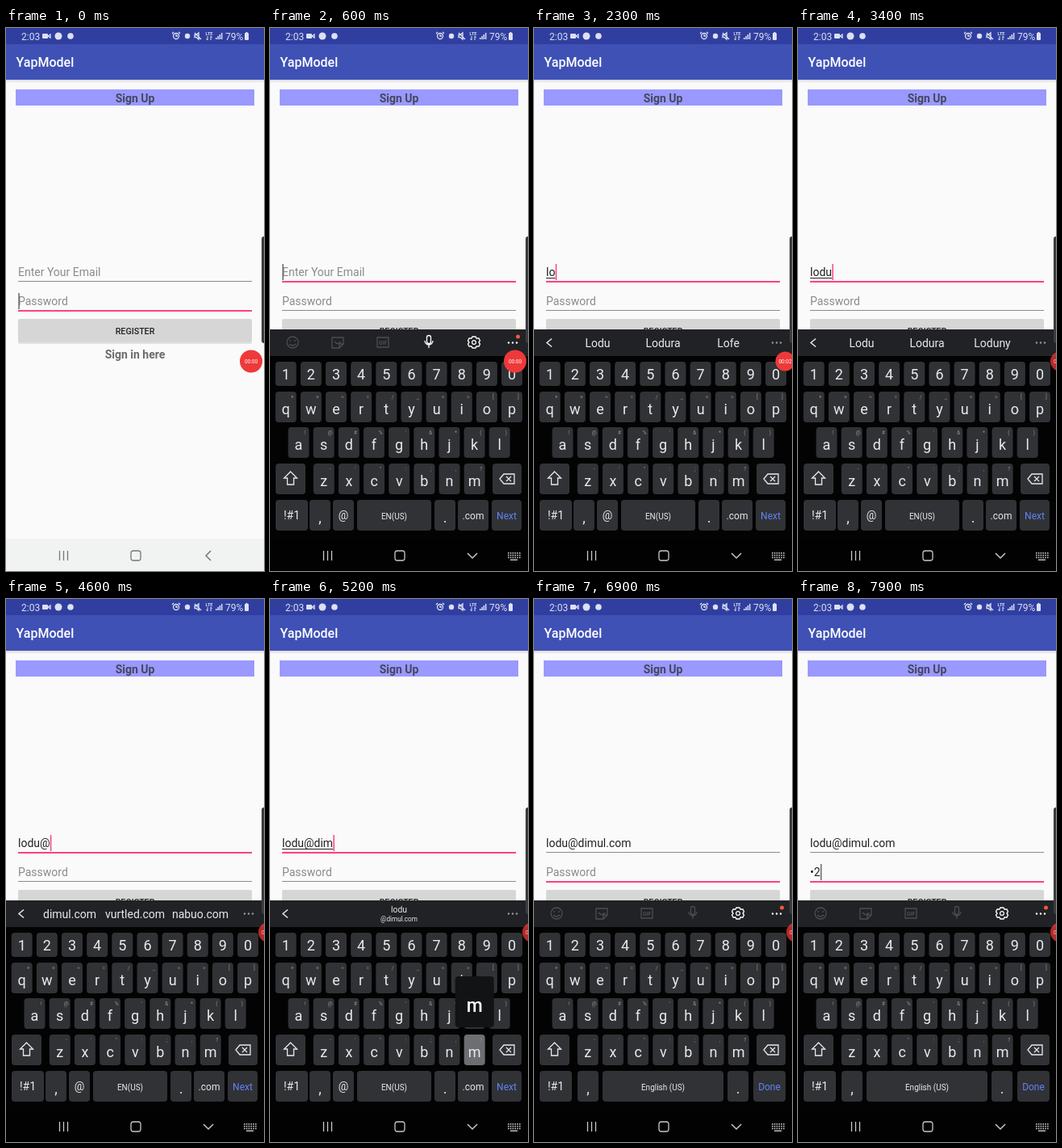
These frames come from a looping animation (320 px wide and 672 px high, 8000 ms). An HTML page with a canvas:

```html
<!DOCTYPE html>
<html lang="en">
<head>
<meta charset="utf-8">
<title>Sign up form</title>
<style>
html, body { margin: 0; width: 100%; height: 100%; overflow: hidden; background: #fafafa; }
canvas { display: block; width: 100vw; height: 100vh; }
</style>
</head>
<body>
<canvas id="stage"></canvas>
<script>
const W = 320, H = 672, LOOP = 8000;
const canvas = document.getElementById('stage');
const scale = window.devicePixelRatio || 1;
canvas.width = W * scale;
canvas.height = H * scale;
const ctx = canvas.getContext('2d');

const PINK = '#ff4081', KEY = '#303236', INK = '#e9e9ea', STRIP = '#202225';
const FOCUS_EMAIL = 200, FOCUS_PASSWORD = 6390;
const SUGGEST_FROM = 1500;

// Each tap: time the label is entered, label
const TAPS = [
  [1000, 'l'], [1280, 'o'], [2600, 'd'], [3190, 'u'], [4200, '@'],
  [4900, 'd'], [5050, 'i'], [5200, 'm'], [5350, 'u'], [5500, 'l'],
  [6080, '.com'], [6300, 'Next'], [7400, '1'], [7700, '2']
];
const SUGGESTIONS = [
  [SUGGEST_FROM, ['Lodu', 'Lodura', 'Lofe']],
  [2800, ['Lodu', 'Lodura', 'Loduny']],
  [4400, ['dimul.com', 'vurtled.com', 'nabuo.com']],
  [5000, null]
];

const clamp = v => Math.max(0, Math.min(1, v));
const easeOut = v => 1 - (1 - clamp(v)) ** 3;

function rect(x, y, w, h, color) {
  ctx.fillStyle = color;
  ctx.fillRect(x, y, w, h);
}

function round(x, y, w, h, r, color) {
  ctx.fillStyle = color;
  ctx.beginPath();
  ctx.roundRect(x, y, w, h, r);
  ctx.fill();
}

function dot(x, y, r, color) {
  ctx.fillStyle = color;
  ctx.beginPath();
  ctx.arc(x, y, r, 0, 7);
  ctx.fill();
}

function stroke(path, x, y, color, width = 1.3) {
  ctx.save();
  ctx.translate(x, y);
  ctx.strokeStyle = color;
  ctx.lineWidth = width;
  ctx.stroke(new Path2D(path));
  ctx.restore();
}

function text(str, x, y, size, color, align = 'center', weight = 400) {
  ctx.font = `${weight} ${size}px Roboto, sans-serif`;
  ctx.fillStyle = color;
  ctx.textAlign = align;
  ctx.fillText(str, x, y);
}

// ---------- keyboard layout ----------
function letterRow(labels, hints, firstX, y, h) {
  return [...labels].map((label, i) => ({
    label, hint: hints[i], x: firstX + i * 31.15 - 13, y, w: 26, h, size: 18, pop: true
  }));
}

const BASE_KEYS = [
  ...letterRow('1234567890', '', 19.7, 413, 30),
  ...letterRow('qwertyuiop', '+×÷=/_<>[]', 19.7, 450, 38),
  ...letterRow('asdfghjkl', "!@#%'&*()", 35.5, 494, 38),
  ...letterRow('zxcvbnm', '-\'":;,?', 66.8, 539, 38),
  { label: 'shift', x: 7, y: 539, w: 37, h: 38 },
  { label: 'erase', x: 276, y: 539, w: 36, h: 38 }
];
const bottomKey = (label, x, w, size, color, pop) => ({ label, x, y: 584, w, h: 38, size, color, pop });
const EMAIL_KEYS = [...BASE_KEYS,
  bottomKey('!#1', 7, 40, 14), bottomKey(',', 49, 26, 18), bottomKey('@', 78, 26, 14, INK, true),
  bottomKey('EN(US)', 108, 92, 10), bottomKey('.', 204, 26, 18), bottomKey('.com', 233, 38, 12),
  bottomKey('Next', 275, 37, 12, '#6282f5')
];
const PASSWORD_KEYS = [...BASE_KEYS,
  bottomKey('!#1', 7, 40, 14), bottomKey(',', 54, 26, 18), bottomKey('English (US)', 85, 150, 10),
  bottomKey('.', 240, 26, 18), bottomKey('Done', 272, 40, 12, '#6282f5')
];

function drawKey(key, pressed) {
  const cx = key.x + key.w / 2, cy = key.y + key.h / 2;
  round(key.x, key.y, key.w, key.h, 4, pressed ? '#6c6e71' : KEY);
  if (key.label === 'shift') {
    stroke('M0-9L8-1H4V7H-4V-1H-8Z', cx, cy, INK);
  } else if (key.label === 'erase') {
    stroke('M-9 0L-4-6H9V6H-4ZM-1-3L5 3M5-3L-1 3', cx, cy, INK);
  } else {
    text(key.label, cx, cy + (key.size === 18 ? (key.h === 30 ? 7 : 9) : 5), key.size, key.color || INK);
    if (key.hint) text(key.hint, key.x + key.w - 5, key.y + 9, 7, '#8a8b8e');
  }
}

function drawPopup(key) {
  const cx = key.x + key.w / 2;
  round(cx - 24, key.y - 72, 48, 63, 4, '#121315');
  text(key.label, cx, key.y - 28, 23, '#fff', 'center', 500);
}

// ---------- strip above the keys ----------
function drawTools(isPassword) {
  const dim = '#4b4d50', mic = isPassword ? dim : '#fff';
  stroke('M7 0A7 7 0 1 1-7 0A7 7 0 1 1 7 0M-4 2Q0 6 4 2M-3-3V-1M3-3V-1', 28, 389, dim);
  stroke('M-7-6H7V2L2 7H-7ZM7 2H2V7M-4-1Q0 4 4-1', 84, 389, dim);
  stroke('M-7-6H7V6H-7Z', 140, 389, dim);
  text('GIF', 140, 392, 7, dim, 'center', 700);
  stroke('M-2.5-5A2.5 2.5 0 0 1 2.5-5V0A2.5 2.5 0 0 1-2.5 0ZM-5-1A5 5 0 0 0 5-1M0 4V8', 197, 388, mic);
  stroke('M2.4 0A2.4 2.4 0 1 1-2.4 0A2.4 2.4 0 1 1 2.4 0M-2-7H2L3-5L6-5L7.5-2L6 0L7.5 2L6 5H3L2 7H-2L-3 5H-6L-7.5 2L-6 0L-7.5-2L-6-5L-3-5Z', 253, 389, '#fff');
  drawMore('#fff');
  dot(307.5, 382, 2.5, '#f0593a');
}

function drawMore(color) {
  [-5, 0, 5].forEach(dx => dot(301 + dx, 389.5, 1.2, color));
}

function drawSuggestions(t) {
  const words = SUGGESTIONS.filter(([from]) => t >= from).pop()[1];
  stroke('M3-5L-3 0L3 5', 19, 389.5, INK, 1.5);
  if (words) {
    words.forEach((word, i) => text(word, 79 + i * 81, 395, 14, INK));
  } else {
    text('lodu', 160, 388, 10.4, INK);
    text('@dimul.com', 160, 399, 8.2, INK);
  }
  drawMore('#96989b');
}

function drawKeyboard(t) {
  const rise = easeOut((t - 200) / 300);
  if (rise === 0) return;
  const isPassword = t >= FOCUS_PASSWORD;
  const keys = isPassword ? PASSWORD_KEYS : EMAIL_KEYS;
  const tap = TAPS.find(([at]) => t >= at - 150 && t < at + 50);
  const pressed = tap && keys.find(key => key.label === tap[1]);
  ctx.save();
  ctx.beginPath();
  ctx.rect(0, 0, W, 632);
  ctx.clip();
  ctx.translate(0, (1 - rise) * 259);
  rect(0, 373, W, 259, '#030304');
  rect(0, 373, W, 33, STRIP);
  if (t >= SUGGEST_FROM && !isPassword) drawSuggestions(t);
  else drawTools(isPassword);
  keys.forEach(key => drawKey(key, key === pressed));
  if (pressed && pressed.pop) drawPopup(pressed);
  ctx.restore();
}

// ---------- form ----------
function drawStatusBar() {
  const ink = '#dde0f2';
  rect(0, 0, W, 20, '#303f9f');
  text('2:03', 19, 14.5, 12, ink, 'left');
  round(45, 7, 7, 6, 1, ink);
  stroke('M0 0L3-2V2Z', 52, 10, ink);
  dot(65, 10, 4.5, ink);
  dot(80, 10, 3.8, ink);
  stroke('M3.5 0A3.5 3.5 0 1 1-3.5 0A3.5 3.5 0 1 1 3.5 0M0-2V0H2M-5-3L-3-5M5-3L3-5', 211, 10, ink);
  dot(225, 10, 3.2, ink);
  stroke('M-4-1.5H-2L1-4V4L-2 1.5H-4ZM-4-4L4 4', 238, 10, ink);
  text('LTE', 252, 9, 5.5, ink, 'center', 700);
  stroke('M-2-2V3M-3.5 1L-2 3M2 3V-2M3.5 0L2-2', 252, 12, ink, 1);
  for (let i = 0; i < 4; i++) rect(260 + i * 2.3, 12 - i * 2, 1.5, 2 + i * 2, ink);
  text('79%', 272, 14.5, 12, ink, 'left');
  round(296, 6, 5, 9, 1, ink);
  rect(297.5, 5, 2, 1, ink);
}

function drawField(value, hint, baseline, focused, cursor, composing) {
  text(value || hint, 15, baseline, 14, value ? '#222' : '#8b8b8b', 'left');
  const end = 15 + (value ? ctx.measureText(value).width : 0);
  if (composing) rect(15, baseline + 2, end - 15, 1, '#222');
  if (focused) rect(15, baseline + 6, 290, 2, PINK);
  else rect(15, baseline + 6, 290, 1, '#8c8c8c');
  if (cursor) rect(end + .3, baseline - 15, 1.5, 20, cursor);
}

function drawForm(t) {
  const typed = TAPS.filter(([at, label]) => t >= at && label !== 'Next');
  const email = typed.filter(([at]) => at < FOCUS_PASSWORD).map(tap => tap[1]).join('');
  const digits = typed.filter(([at]) => at > FOCUS_PASSWORD).map(tap => tap[1]);
  const password = digits.map((d, i) => i < digits.length - 1 ? '•' : d).join('');
  const onEmail = t >= FOCUS_EMAIL && t < FOCUS_PASSWORD;

  const lastEvent = Math.max(...[0, FOCUS_EMAIL, FOCUS_PASSWORD, ...typed.map(tap => tap[0])].filter(at => at <= t));
  const visible = (t - lastEvent) % 1000 < 500;
  const cursor = visible && (onEmail && email ? PINK : '#666');

  rect(0, 0, W, H, '#fafafa');
  rect(0, 20, W, 44, '#3f51b5');
  const shade = ctx.createLinearGradient(0, 64, 0, 68);
  shade.addColorStop(0, '#d9d9dc');
  shade.addColorStop(1, '#fafafa');
  rect(0, 64, W, 4, shade);
  drawStatusBar();
  text('YapModel', 12.5, 48, 16, '#fff', 'left', 500);

  rect(12, 76, 296, 20, '#9999ff');
  text('Sign Up', 160, 91.5, 14, '#46465c', 'center', 700);
  drawField(email, 'Enter Your Email', 307, onEmail, onEmail && cursor,
    onEmail && email && !email.endsWith('@'));
  drawField(password, 'Password', 343, !onEmail, !onEmail && cursor);
  round(15, 361, 290, 30, 2, '#e2e2e2');
  round(15, 360, 290, 29, 2, '#d6d6d6');
  text('REGISTER', 160, 379, 10.7, '#222', 'center', 500);
  text('Sign in here', 160, 409, 14, '#6b6b6b', 'center', 700);
}

function drawNavigation(t) {
  const open = t >= 300;
  const ink = open ? '#c9c9c9' : '#777';
  rect(0, 632, W, 40, open ? '#020202' : '#f1f2f2');
  stroke('M-5-6V6M0-6V6M5-6V6', 71.5, 653, ink);
  stroke('M-3-6H3Q6-6 6-3V3Q6 6 3 6H-3Q-6 6-6 3V-3Q-6-6-3-6Z', 161, 653, ink);
  stroke(open ? 'M-6-3L0 3L6-3' : 'M3-6L-3 0L3 6', 251, 653, ink, 1.5);
  if (!open) return;
  for (let row = 0; row < 3; row++)
    for (let col = 0; col < 6; col++) rect(295 + col * 2.8, 649 + row * 2.8, 1.6, 1.6, ink);
  rect(298, 657.5, 9, 1.4, ink);
}

function drawRecorder(t) {
  const shrink = easeOut((t - 1900) / 300);
  const x = 304 + 7.5 * shrink + 13.5 * easeOut((t - 2500) / 400);
  ctx.globalAlpha = 1 - .25 * clamp((t - 2500) / 400);
  dot(x, 412.5, 14 - 2 * shrink, '#ef3939');
  text('00:0' + Math.floor(t / 1000), x, 415, 6.5, '#fff');
  ctx.globalAlpha = 1;
}

function draw(t) {
  ctx.setTransform(canvas.width / W, 0, 0, canvas.height / H, 0, 0);
  drawForm(t);
  drawKeyboard(t);
  drawNavigation(t);
  round(317, 258, 6, 132, 3, '#3b3b3f');
  drawRecorder(t);
}

const start = performance.now();
function tick() {
  draw((performance.now() - start) % LOOP);
  requestAnimationFrame(tick);
}
tick();
</script>
</body>
</html>
```
